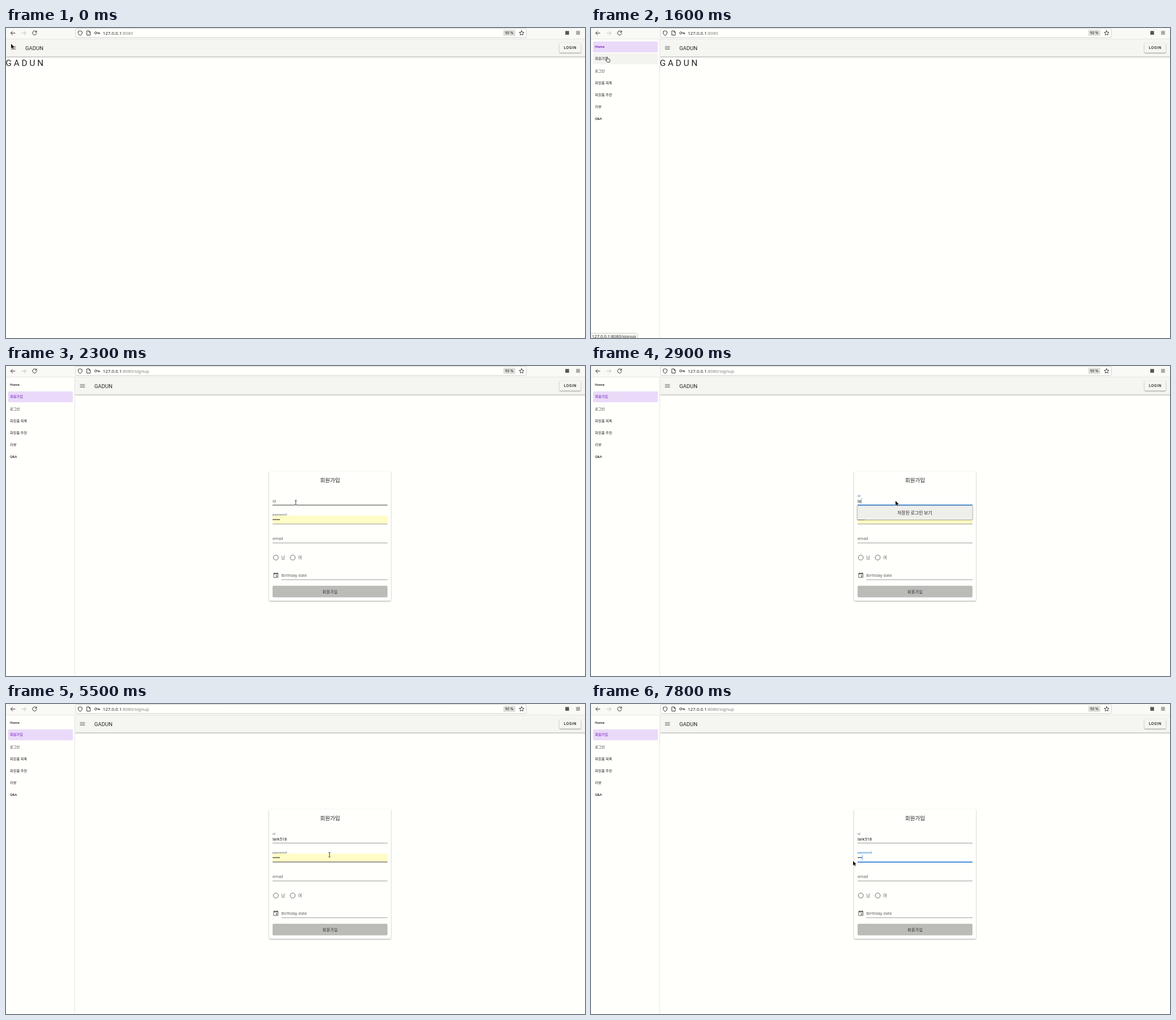
Write an HTML page with a canvas that moves like this. It is 1023 by 547 pixels and loops after 8 s.

```html
<!DOCTYPE html>
<html lang="ko">
<head>
<meta charset="utf-8">
<title>Sign-up walkthrough</title>
<style>
html, body { margin: 0; width: 100%; height: 100%; overflow: hidden; background: #fffffc; }
canvas { display: block; width: 1023px; height: 547px; }
</style>
</head>
<body>
<canvas id="stage"></canvas>
<script>
const W = 1023, H = 547, LOOP = 8000, STEP = 100;
const canvas = document.getElementById('stage');
const ctx = canvas.getContext('2d');
const dpr = window.devicePixelRatio || 1;
canvas.width = W * dpr;
canvas.height = H * dpr;

const UNIT = 0.4795; // stage pixels per page pixel
const ROBOTO = 'Roboto, "Noto Sans CJK KR", "Noto Sans CJK", sans-serif';
const NOTO = '"Noto Sans", "Noto Sans CJK KR", "Noto Sans CJK", sans-serif';
const PAPER = '#fffffc', BAR = '#f5f5f1', INK = '#222', MUTED = '#686866';
const BLUE = '#1976d2', PURPLE = '#6c0cb8', LINE = '#8e8e8b';
const BRAND = 'GADUN', USER_ID = 'lark518', DRAWER = 122;
const MENU = ['Home', '회원가입', '로그인', '화장품 목록', '화장품 추천', '리뷰', 'Q&A'];

// time, x, y, shape
const POINTER = [
  [0, 9, 28, 'arrow'], [100, 9, 28, 'none'], [300, 6, 32, 'hand'], [500, 6, 32, 'hand'],
  [700, 9, 35, 'hand'], [900, 14, 43, 'hand'], [1100, 24, 54, 'hand'], [1300, 29, 57, 'hand'],
  [1400, 27, 50, 'hand'], [1700, 28, 52, 'arrow'], [1900, 150, 120, 'arrow'],
  [2100, 420, 222, 'arrow'], [2200, 490, 238, 'beam'], [2300, 512, 241, 'beam'],
  [2400, 518, 241, 'beam'], [2700, 538, 240, 'beam'], [2900, 538, 238, 'arrow'],
  [4500, 538, 238, 'arrow'], [4600, 609, 224, 'arrow'], [4700, 609, 224, 'arrow'],
  [5100, 794, 277, 'arrow'], [5200, 794, 277, 'arrow'], [5400, 610, 269, 'beam'],
  [5500, 571.5, 266, 'beam'], [5700, 565, 268, 'beam'], [5900, 490, 271, 'beam'],
  [6000, 463, 272, 'arrow'], [6600, 463, 272, 'arrow'], [6700, 463, 277, 'arrow']
];
const ID_LENGTH = [[0, 0], [2700, 1], [2900, 2], [3100, 3], [3300, 4], [4000, 5], [4100, 6], [4300, 7]];
const PASS_LENGTH = [[0, 5], [6700, 4], [6800, 3], [6900, 2], [7000, 1], [7100, 0],
  [7400, 1], [7600, 2], [7800, 3]];

const clamp = v => Math.max(0, Math.min(1, v));
const mix = (a, b, p) => a + (b - a) * p;
const ease = v => { const p = clamp(v); return p * p * (3 - 2 * p); };
const between = (t, a, b) => t >= a && t < b;
const valueAt = (keys, t) => keys.filter(k => k[0] <= t).pop()[1];

function pointerAt(t) {
  const i = POINTER.filter(k => k[0] <= t).length - 1;
  const a = POINTER[i], b = POINTER[i + 1] || a;
  const p = b === a ? 0 : (t - a[0]) / (b[0] - a[0]);
  return { x: mix(a[1], b[1], p), y: mix(a[2], b[2], p), shape: a[3] };
}

function text(str, x, y, size, { color = INK, weight = 400, family = ROBOTO, align = 'left', gap = 0 } = {}) {
  ctx.font = `${weight} ${size}px ${family}`;
  ctx.letterSpacing = gap + 'px';
  ctx.textAlign = align;
  ctx.fillStyle = color;
  ctx.fillText(str, x, y);
  const width = ctx.measureText(str).width;
  ctx.letterSpacing = '0px';
  return width;
}

function rect(x, y, w, h, color) {
  ctx.fillStyle = color;
  ctx.fillRect(x, y, w, h);
}

function box(x, y, w, h, r, fill, border) {
  ctx.beginPath();
  ctx.roundRect(x, y, w, h, r);
  if (fill) { ctx.fillStyle = fill; ctx.fill(); }
  if (border) { ctx.strokeStyle = border; ctx.lineWidth = 0.8; ctx.stroke(); }
}

function raised(blur, dy, alpha, draw) {
  ctx.save();
  ctx.shadowColor = `rgba(0,0,0,${alpha})`;
  ctx.shadowBlur = blur * dpr;
  ctx.shadowOffsetY = dy * dpr;
  draw();
  ctx.restore();
}

function stroke(d, x, y, color = '#333', width = 1) {
  ctx.save();
  ctx.translate(x, y);
  ctx.strokeStyle = color;
  ctx.lineWidth = width;
  ctx.lineCap = ctx.lineJoin = 'round';
  ctx.stroke(new Path2D(d));
  ctx.restore();
}

function bars(x, y, w, gap, color) {
  for (let i = -1; i <= 1; i++) rect(x, y + i * gap - 0.5, w, 1, color);
}

function browserBar(signup) {
  rect(0, 0, W, 19.5, '#f9f9f5');
  rect(0, 19.3, W, 0.7, '#dededa');
  stroke('M7.5 0H0M3.2 -3.2L0 0L3.2 3.2', 8.4, 9);
  stroke('M0 0H7.5M4.3 -3.2L7.5 0L4.3 3.2', 27.8, 9, '#bcbcb9');
  stroke('M3 -2.6A3.7 3.7 0 1 0 3.7 .6M3.6 -4V-1.6H1.2', 50.5, 9);

  box(122.9, 0.8, 796.4, 16, 2, PAPER, '#c6c6c2');
  stroke('M0 -4L3.4 -2.7V0Q3.1 3 0 4.2Q-3.1 3 -3.4 0V-2.7Z', 131, 9);
  stroke('M-2.8 -3.7H.8L2.9 -1.5V3.8H-2.8ZM.8 -3.5V-1.4H2.7', 146, 8.8);
  stroke('M-.6 0A1.9 1.9 0 1 1 -4.4 0A1.9 1.9 0 1 1 -.6 0H4.5V1.8M2.5 0V1.6', 161, 8.7);
  const host = { family: NOTO, color: '#222' };
  const w = text('127.0.0.1', 171, 11.7, 7.9, host);
  text(':8080' + (signup ? '/signup' : ''), 171 + w, 11.7, 7.9, { family: NOTO, color: '#80807d' });
  box(878.5, 3.3, 21.5, 10.8, 1.5, '#dfdfdc');
  text('90 %', 889.2, 11.3, 6.6, { family: NOTO, weight: 500, align: 'center' });

  let star = '';
  for (let i = 0; i < 10; i++) {
    const r = i % 2 ? 2 : 4.4, a = i * Math.PI / 5 - Math.PI / 2;
    star += (i ? 'L' : 'M') + r * Math.cos(a) + ' ' + r * Math.sin(a);
  }
  stroke(star + 'Z', 911, 9, '#333', 0.9);
  rect(988.2, 5.3, 6.6, 6.6, '#555');
  bars(1007.3, 8.5, 6.8, 2.4, '#444');
}

function appBar(shift) {
  raised(3, 1.2, 0.5, () => rect(shift, 20, W - shift + 8, 30, BAR));
  rect(shift, 20, W - shift, 30.2, BAR);
  bars(shift + 8.7, 35.1, 8.7, 2.4, '#71716f');
  text(BRAND, shift + 34, 38.5, 20 * UNIT);
  raised(2, 0.9, 0.4, () => box(977.7, 26.3, 38, 17.3, 2, BAR));
  text('LOGIN', 985.8, 37.4, 14 * UNIT, { weight: 500, gap: 0.6 });
}

function drawer(shift, active, hover) {
  const x0 = shift - DRAWER;
  rect(x0, 20, DRAWER, H - 20, PAPER);
  rect(shift - 0.8, 20, 0.7, H - 20, '#d8d8d5');
  MENU.forEach((label, i) => {
    const y = 23.7 + i * 21.05;
    const on = i === active;
    if (on) box(x0 + 3.5, y, 114.6, 19.2, 2, '#eadaf9');
    else if (i === hover) box(x0 + 3.5, y, 114.6, 19.2, 2, '#f3f3f0');
    text(label, x0 + 7, y + 11.7, 13 * UNIT, { weight: 500, color: on ? PURPLE : INK });
  });
}

function statusBar() {
  box(-3, 538.5, 85.3, 14, 2, '#f6f6f3', '#c4c4c1');
  text('127.0.0.1:8080/signup', 1.8, 547.4, 7.5, { family: NOTO, color: '#333' });
}

function underline(x, y, focus, hover) {
  if (focus) rect(x, y - 0.8, 674 - x, 1.6, BLUE);
  else rect(x, y - 0.5, 674 - x, 0.9, hover ? '#2c2c2b' : LINE);
}

function caret(x, y) {
  rect(x + 0.2, y - 4.5, 0.7, 9, BLUE);
}

function suggestions(y, h) {
  raised(2, 0.7, 0.25, () => box(470.4, y, 203.8, h, 0.5, '#fafaf7', '#bdbdba'));
  rect(471.2, y + h - 23.4, 202.2, 21, '#eeeeeb');
  text('저장된 로그인 보기', 572, y + h - 9.5, 7.8, { family: NOTO, align: 'center' });
}

function form(t, pointer) {
  raised(2.5, 1, 0.36, () => box(464.8, 186, 215.2, 228.2, 2, PAPER));
  text('회원가입', 572.5, 204.7, 20 * UNIT, { weight: 500, align: 'center' });

  const size = 16 * UNIT, small = 12 * UNIT;
  const idFocus = between(t, 2500, 5200), passFocus = t >= 5700;
  const inField = pointer.shape === 'beam';
  const overId = inField && between(pointer.y, 225, 247);
  const overPass = inField && between(pointer.y, 258, 281);

  const p = ease((t - 2400) / 400);
  text('id', 471, mix(240.8, 230.5, p), mix(size, small, p), { color: idFocus ? BLUE : MUTED });
  const typed = USER_ID.slice(0, valueAt(ID_LENGTH, t));
  const width = text(typed, 471, 240.7, size);
  if (idFocus && !between(t, 3700, 4000)) caret(471 + width, 238);
  underline(471, 245.4, idFocus, overId);

  const filled = t >= 1800;
  if (filled && t < 6700) rect(471, 264, 203, 15, '#fffcc6');
  text('password', 471, filled ? 264 : 273.8, filled ? small : size, { color: passFocus ? BLUE : MUTED });
  const dots = filled ? valueAt(PASS_LENGTH, t) : 0;
  ctx.fillStyle = INK;
  for (let i = 0; i < dots; i++) {
    ctx.beginPath();
    ctx.arc(472.3 + i * 2.58, 271, 0.95, 0, 2 * Math.PI);
    ctx.fill();
  }
  if (passFocus) caret(471 + dots * 2.58, 271.2);
  underline(471, 278.9, passFocus, overPass);

  text('email', 471, 307.1, size, { color: MUTED });
  underline(471, 312.2);

  [['남', 476.7], ['여', 506.6]].forEach(([label, x]) => {
    ctx.beginPath();
    ctx.arc(x, 338, 4.4, 0, 2 * Math.PI);
    ctx.strokeStyle = '#696967';
    ctx.lineWidth = 1;
    ctx.stroke();
    text(label, x + 9.4, 340.9, size, { color: MUTED });
  });

  ctx.save();
  ctx.translate(471, 363.7);
  ctx.scale(UNIT, UNIT);
  ctx.fillStyle = '#60605e';
  ctx.fill(new Path2D('M17 12h-5v5h5zM16 1v2H8V1H6v2H5q-2 0-2 2v14q0 2 2 2h14q2 0 2-2V5q0-2-2-2h-1V1zM19 19H5V8h14z'), 'evenodd');
  ctx.restore();
  text('Birthday date', 486.5, 372.3, size, { color: MUTED });
  underline(486.5, 377.1);

  box(471, 387.8, 203, 20.4, 2, '#bbbcb8');
  text('회원가입', 572.8, 400.8, 14 * UNIT, { weight: 500, align: 'center', gap: 0.6 });

  if (between(t, 2900, 5200)) suggestions(246.4, 24.6);
  if (between(t, 7300, 7500)) suggestions(280.2, 85.6);
}

const SHAPES = {
  arrow: new Path2D('M0 0V8L1.9 6.3L3.2 9L4.5 8.4L3.3 5.8H5.9Z'),
  hand: new Path2D('M0 .3Q.8 -.6 1.5 .5L2.1 3.2L3.2 3L4.2 3.4L5.3 3.9L5.8 5V7.2L5.2 9H1L-1.7 5.8Q-1.6 4.6 -.5 5L.4 5.5Z'),
  beam: new Path2D('M-1.8 -4H-.5L0 -3.5L.5 -4H1.8M0 -3.5V3.5M-1.8 4H-.5L0 3.5L.5 4H1.8')
};

function drawPointer({ x, y, shape }) {
  if (shape === 'none') return;
  const path = SHAPES[shape];
  ctx.save();
  ctx.translate(x, y);
  ctx.lineJoin = 'round';
  ctx.lineWidth = shape === 'beam' ? 1.8 : 1;
  ctx.strokeStyle = 'rgba(255,255,255,.75)';
  ctx.stroke(path);
  ctx.lineWidth = 0.9;
  ctx.strokeStyle = '#222';
  if (shape !== 'beam') {
    ctx.fillStyle = shape === 'hand' ? '#fff' : '#111';
    ctx.fill(path);
  }
  if (shape !== 'arrow') ctx.stroke(path);
  ctx.restore();
}

function draw(t) {
  ctx.setTransform(dpr, 0, 0, dpr, 0, 0);
  rect(0, 0, W, H, PAPER);
  const signup = t >= 1700;
  const shift = DRAWER * ease((t - 400) / 300);
  const pointer = pointerAt(t);
  const hover = shift === DRAWER && pointer.x < 118 ? Math.floor((pointer.y - 23.7) / 21.05) : -1;

  appBar(shift);
  if (signup) form(t, pointer);
  else text([...BRAND].join(' '), shift - 0.5, 67.4, 32 * UNIT);
  if (shift > 0) drawer(shift, signup ? 1 : 0, hover);
  if (between(t, 1200, 1800)) statusBar();
  browserBar(signup);
  drawPointer(pointer);
}

const start = performance.now();
function tick() {
  const t = (performance.now() - start) % LOOP;
  draw(Math.floor(t / STEP) * STEP);
  requestAnimationFrame(tick);
}
tick();
</script>
</body>
</html>
```
